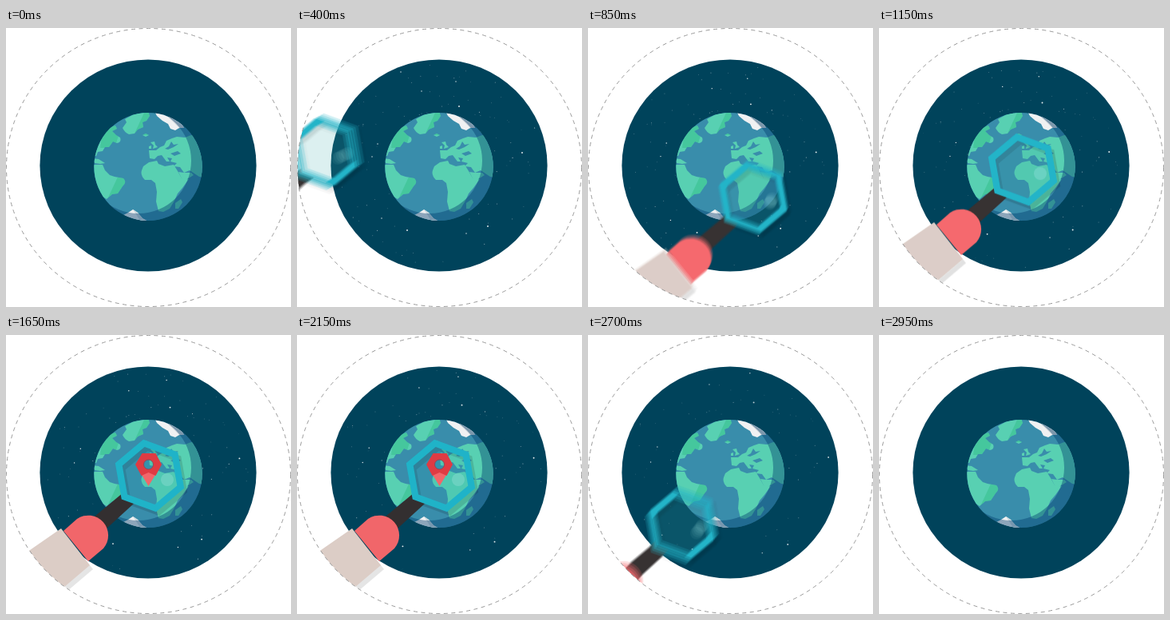
An HTML page with a canvas that plays this animation: 357x349 px, repeating every 3000 ms.

```html
<!DOCTYPE html>
<html lang="en">
<head>
<meta charset="utf-8">
<title>Globe search</title>
<style>
  html, body { margin: 0; width: 100%; height: 100%; overflow: hidden; background: #fff; }
  canvas { display: block; }
</style>
</head>
<body>
<canvas id="stage" width="357" height="349"></canvas>
<script>
const W = 357, H = 349, LOOP = 3000, STEP = 50;
const ctx = document.getElementById('stage').getContext('2d');

const layer = (w, h) => {
  const c = document.createElement('canvas');
  c.width = w;
  c.height = h;
  return c.getContext('2d');
};

const oval = (x, y, rx, ry = rx) => {
  const p = new Path2D();
  p.ellipse(x, y, rx, ry, 0, 0, Math.PI * 2);
  return p;
};

const fill = (c, color, shape, rule = 'nonzero') => {
  c.fillStyle = color;
  c.fill(typeof shape === 'string' ? new Path2D(shape) : shape, rule);
};

const clamp = x => Math.max(0, Math.min(1, x));
const ramp = (t, a, b) => clamp((t - a) / (b - a));
const smooth = x => x * x * (3 - 2 * x);

const RIM = oval(178.5, 174.5, 178, 174);
const DISC = oval(178, 172, 135.6, 132.5);
const GLOBE = oval(178, 173.5, 67.7, 67.5);

// Globe
const LAND = [
  'M146 125L151 118L149 114L160 108L178 104L180 110L176 116L171 118L172 124L165 127L161 132L154 133Q148 130 146 125Z',
  'M108 160L112 147L119 135L128 125L137 122L139 126L133 129L138 134L143 137Q145 143 139 144L134 142L129 149L124 149L121 154L115 155L113 160Z',
  'M109 163L116 164L124 169L118 170L111 169Z',
  'M108 171L121 171L124 178L130 184L136 186L147 188Q152 193 146 198L140 207L133 208L126 214L116 208L108 190Z',
  'M171 134L175 132L179 134L175 136Z',
  'M181 143L186 142L187 146L190 149L184 151L185 147ZM179 148L182 147L182 151L179 151Z',
  'M179 153L188 153L193 149L198 147L201 141L208 138L214 136L224 137L232 134L250 135L250 187L242 186L236 182L230 178L223 181L218 174L210 173L214 169L206 167L208 163L202 162L205 167L201 167L195 159L190 160L186 164L180 163Z',
  'M172 173L179 168L189 166L191 170L199 173L210 171L215 179L221 190L229 189L221 200L215 207L211 216L205 226L197 230L191 229L188 217L189 205L187 194L182 190L174 190Q168 184 170 178Z',
  'M216 180L223 181L232 181L235 184L222 192Z',
  'M212 219L219 214L221 218L216 226L212 226Z'
].join('');
const SEA = 'M199 151L204 148L207 142L210 146L216 145L210 149L203 152ZM206 157L215 154L219 157L211 160Z';

const globe = layer(W, H);
globe.clip(GLOBE);
fill(globe, '#398dab', 'M100 100H260V250H100Z');
fill(globe, '#58d0b2', LAND);
fill(globe, '#398dab', SEA);
globe.save();
globe.clip(new Path2D(LAND));
fill(globe, 'rgba(40,184,125,.4)', 'M174 104H184V134H160ZM122 120H146L136 150H118ZM142 182H156V214H127Z');
globe.restore();
fill(globe, '#f0f1f2', 'M186 104L206 106L218 115L223 125L217 125L212 128L206 126L203 120L196 116L189 110Z');
fill(globe, '#d3d8db', 'M199 106L218 115L223 125L217 125L207 115Z');
fill(globe, '#f0f1f2', 'M145 235L153 231L159 227L165 231L171 238L178 242H155Z');
fill(globe, '#ccd9df', 'M159 227L165 231L171 238L178 242L168 241Z');
const shade = new Path2D('M100 90H260V260H100Z');
shade.addPath(oval(166, 166, 66));
fill(globe, 'rgba(0,60,108,.42)', shade, 'evenodd');

// Magnifier, drawn in its resting place
const PAD = 150;
const hexagon = r => {
  const pts = Array.from({ length: 6 }, (_, i) => {
    const a = (-100 + i * 60) * Math.PI / 180;
    return (180 + r * Math.cos(a)).toFixed(2) + ' ' + (176 + r * Math.sin(a)).toFixed(2);
  });
  return 'M' + pts.join('L') + 'Z';
};
const RING = hexagon(46) + hexagon(36.5);
const HANDLE = 'M147 197L161 210L126 242L111 227Z';
const SLEEVE = 'M69 242L105 288L72 316Q30 344 -60 375L-140 395V325L-80 310Q-10 291 30 269Z';
const tool = layer(W + PAD * 2, 420);
tool.translate(PAD, 0);
tool.save();
tool.translate(4, 5);
fill(tool, 'rgba(0,0,0,.13)', RING, 'evenodd');
fill(tool, 'rgba(0,0,0,.1)', SLEEVE);
tool.restore();
fill(tool, 'rgba(40,165,180,.17)', hexagon(38));
fill(tool, 'rgba(160,225,220,.35)', oval(202, 181, 8));
fill(tool, '#332f30', HANDLE);
fill(tool, '#1fb3c8', RING, 'evenodd');
fill(tool, '#f1666a', 'M72 245L89 230A25 25 0 0 1 122 267L103 283Z');
fill(tool, '#dccdc6', SLEEVE);

// time, x, y
const PATH = [
  [150, -260, 40], [400, -145, -21], [530, -50, -62], [650, 16, -59],
  [750, 40, -12], [850, 27, 36], [920, 17, 38], [1020, 4, 16], [1130, 0, 2],
  [1300, 0, 0], [2230, 0, 0], [2550, -24, 13], [2750, -80, 85], [2920, -160, 190]
];
const slope = (i, k) => {
  const a = PATH[Math.max(0, i - 1)], b = PATH[Math.min(PATH.length - 1, i + 1)];
  return (b[k] - a[k]) / (b[0] - a[0]);
};
const place = t => {
  const last = PATH.length - 1;
  if (t <= PATH[0][0]) return PATH[0].slice(1);
  if (t >= PATH[last][0]) return PATH[last].slice(1);
  const i = PATH.findIndex(p => p[0] > t) - 1;
  const a = PATH[i], b = PATH[i + 1], d = b[0] - a[0], s = (t - a[0]) / d;
  return [1, 2].map(k => {
    if (a[k] === b[k]) return a[k];
    const h = smooth(s);
    return a[k] * (1 - h) + b[k] * h
      + d * s * (1 - s) * ((1 - s) * slope(i, k) - s * slope(i + 1, k));
  });
};

// Average a few poses over the open shutter; 5 divides 255, so colours stay true
const SHUTTER = 27, SAMPLES = 5;
const blur = layer(W, H);
const drawTool = t => {
  if (t <= 150 || t >= 2920) return;
  const still = t > 1320 && t < 2210;
  const n = still ? 1 : SAMPLES;
  blur.clearRect(0, 0, W, H);
  blur.globalCompositeOperation = 'lighter';
  blur.globalAlpha = 1 / n;
  for (let i = 0; i < n; i++) {
    const [x, y] = place(t + SHUTTER * ((i + 0.5) / n - 0.5));
    blur.drawImage(tool.canvas, x - PAD, y);
  }
  ctx.save();
  ctx.clip(RIM);
  ctx.drawImage(blur.canvas, 0, 0);
  ctx.restore();
};

// Stars, as offsets from the disc centre
let seed = 11;
const rnd = () => (seed = seed * 16807 % 2147483647) / 2147483647;
const bright = [
  [-48, -117], [21, -105], [-22, -93], [25, -74], [120, -47], [-77, -27],
  [-84, -11], [104, -16], [61, 76], [34, 85], [-72, 66], [-40, 81]
];
const stars = bright.map(([x, y], i) => ({ x, y, r: i % 4 === 3 || i === 8 ? 0.95 : 0.7, a: 0.9 }));
for (let i = 0; i < 110; i++) {
  const a = rnd() * Math.PI * 2, d = Math.sqrt(rnd()) * 127;
  stars.push({ x: d * Math.cos(a), y: d * Math.sin(a), r: 0.35 + rnd() * 0.25, a: 0.25 + rnd() * 0.4 });
}
const SKY = oval(178, 172, 129, 129);
const drawStars = t => {
  const show = ramp(t, 50, 350) * (1 - ramp(t, 2650, 2950));
  if (!show) return;
  const k = 1 + 0.00008 * (t - 400);
  ctx.save();
  ctx.clip(SKY);
  for (const s of stars) {
    ctx.globalAlpha = s.a * show;
    fill(ctx, '#fff', oval(178 + s.x * k, 172 + s.y * k, s.r));
  }
  ctx.restore();
};

const drawPin = t => {
  const k = smooth(ramp(t, 1200, 1450)) * (1 - smooth(ramp(t, 2150, 2400)));
  if (!k) return;
  ctx.save();
  ctx.translate(178.5, 189);
  ctx.scale(k, k);
  fill(ctx, '#f1666a', 'M-11 -18H11L0 0Z');
  const head = new Path2D('M-8 -41H9L16.500 -27L9 -13L0 -17L-9 -13L-16.500 -27Z');
  head.addPath(oval(0, -27, 6));
  fill(ctx, '#df3b43', head, 'evenodd');
  ctx.strokeStyle = '#8c4a58';
  ctx.lineWidth = 1;
  ctx.stroke(oval(0, -27, 6));
  ctx.restore();
};

const draw = t => {
  fill(ctx, '#fff', 'M0 0H357V349H0Z');
  fill(ctx, '#00435b', DISC);
  drawStars(t);
  ctx.drawImage(globe.canvas, 0, 0);
  drawTool(t);
  drawPin(t);
  ctx.save();
  ctx.strokeStyle = '#8f8f8f';
  ctx.lineWidth = 0.9;
  ctx.setLineDash([5, 4.5]);
  ctx.stroke(RIM);
  ctx.restore();
};

const start = performance.now();
const tick = () => {
  const t = (performance.now() - start) % LOOP;
  draw(Math.floor(t / STEP) * STEP);
  requestAnimationFrame(tick);
};
tick();
</script>
</body>
</html>
```
